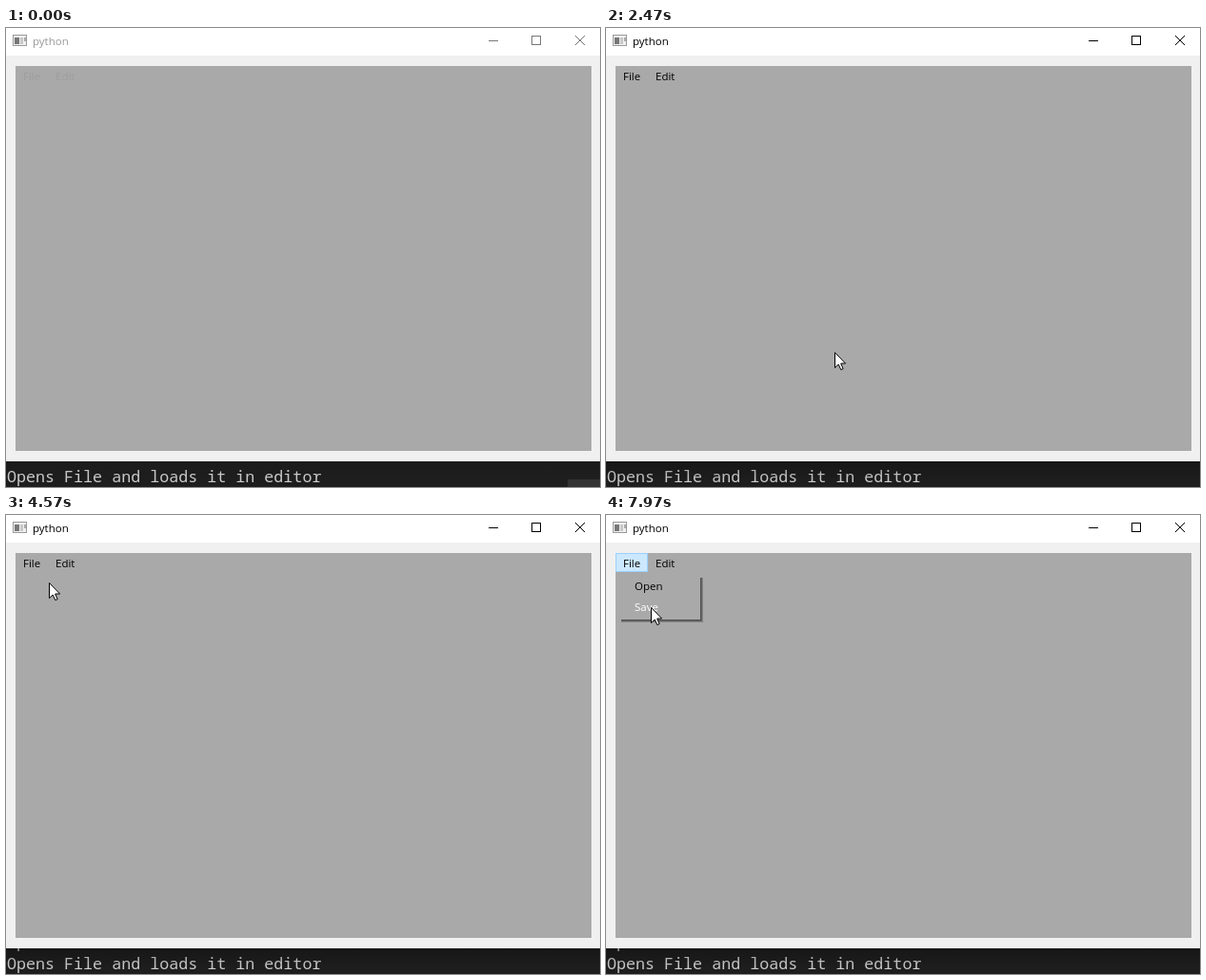
An HTML page for the animation above (8000 ms loop, 624x483 px).

```html
<!DOCTYPE html>
<html lang="en">
<head>
<meta charset="utf-8">
<title>python</title>
<style>
  html, body { margin: 0; width: 100%; height: 100%; overflow: hidden; }
  svg { display: block; width: 624px; height: 483px; }
  .ui { font: 11.5px "Open Sans", "Noto Sans", sans-serif; }
  .term { font: 16.7px "Noto Sans Mono", monospace; fill: #ccc; white-space: pre; }
  .caption { fill: none; stroke: currentColor; }
  .crisp { shape-rendering: crispEdges; }
</style>
</head>
<body>
<svg viewBox="0 0 624 483">
  <defs>
    <linearGradient id="shade" x2="0" y2="1">
      <stop stop-opacity=".25"/>
      <stop offset="1" stop-opacity="0"/>
    </linearGradient>
    <clipPath id="console"><rect y="456" width="624" height="27"/></clipPath>
  </defs>

  <rect width="624" height="456" fill="#f0f0f0"/>
  <rect width="624" height="29" fill="#fff"/>
  <rect x="10" y="40" width="605" height="405" fill="#a9a9a9"/>

  <!-- title bar -->
  <g class="crisp">
    <rect x="7.5" y="7.5" width="14" height="11" fill="#f0f0f0" stroke="#999"/>
    <rect x="9" y="10" width="5" height="7" fill="#777"/>
    <rect x="15" y="10" width="3" height="7" fill="#c8c8c8"/>
    <rect x="19" y="10" width="2" height="4" fill="#aaa"/>
  </g>
  <text id="title" class="ui" x="28" y="18">python</text>
  <g id="buttons" class="caption">
    <path class="crisp" d="M507 13.5h10M552.5 8.5h9v9h-9z"/>
    <path d="M598 8l10 10M608 8l-10 10"/>
  </g>

  <!-- menu bar -->
  <rect id="fileBox" class="crisp" x="10.5" y="40.5" width="33" height="19"/>
  <g id="bar" class="ui">
    <text x="18" y="55">File</text>
    <text x="52" y="55">Edit</text>
  </g>
  <g id="menu" class="ui">
    <g id="drop" fill-opacity=".22"></g>
    <rect x="10" y="60" width="89" height="50" fill="#a9a9a9"/>
    <text id="open" x="30" y="79">Open</text>
    <text id="save" x="30" y="101">Save</text>
  </g>

  <!-- console -->
  <g clip-path="url(#console)">
    <rect y="456" width="624" height="27" fill="#1e1e1e"/>
    <text id="previous" class="term" x="1" y="454.5">Opens File and loads it in editor</text>
    <text class="term" x="1" y="478">Opens File and loads it in editor</text>
    <rect id="shadow" y="456" width="624" height="21" fill="url(#shade)"/>
    <rect id="patch" x="590" y="475" width="34" height="8" fill="#333"/>
  </g>

  <path id="cursor" d="M.5 .5V16.6L4.2 13 6.8 18.6 9.1 17.6 6.7 12H11.6Z" fill="#fff" stroke="#000"/>
</svg>
<script>
const LOOP = 8000, REFRESH = 70;
const ENTER = 540, ACTIVATE = 1220, PRESS = 3740, CHOOSE = 4490, REOPEN = 7200;
const $ = id => document.getElementById(id);

// The pointer glides to each stop, then rests until the next glide
const glide = (start, end, x, y) => ({ start, end, x, y });
const glides = [
  glide(ENTER, 960, 520, 344),
  glide(1290, 1990, 357, 386),
  glide(1990, 2410, 240, 341),
  glide(2830, PRESS, 19, 44),
  glide(PRESS, 4230, 45, 71),
  glide(5430, 5570, 51, 71),
  glide(5770, 6260, 29, 52),
  glide(REOPEN, 7970, 47, 97)
];

// Soft drop shadow built from nested rectangles
for (let i = 1; i <= 3; i++) {
  const r = document.createElementNS("http://www.w3.org/2000/svg", "rect");
  const box = { x: 16, y: 66, width: 83 + i, height: 44 + i };
  for (const k in box) r.setAttribute(k, box[k]);
  $("drop").append(r);
}

const ease = u => u * u * (3 - 2 * u);

function pointer(t) {
  let x = 610, y = 468;
  for (const g of glides) {
    if (t < g.start) break;
    const shown = Math.floor((t - g.start) / REFRESH) * REFRESH;
    const k = ease(Math.min(1, shown / (g.end - g.start)));
    x += (g.x - x) * k;
    y += (g.y - y) * k;
  }
  return [Math.round(x), Math.round(y)];
}

const show = (id, on) => { $(id).style.visibility = on ? "visible" : "hidden"; };

function render(t) {
  const [x, y] = pointer(t);
  const active = t >= ACTIVATE;
  const pressed = (t >= PRESS && t < CHOOSE) || t >= REOPEN;
  const fading = t >= CHOOSE && t < CHOOSE + REFRESH;
  const hover = x >= 10 && x < 44 && y >= 40 && y < 60;

  show("cursor", t >= ENTER);
  $("cursor").setAttribute("transform", `translate(${x} ${y})`);

  $("title").style.fill = active ? "#000" : "#999";
  $("buttons").style.color = active ? "#000" : "#777";
  $("bar").style.fill = active ? "#000" : "#9e9e9e";
  $("shadow").style.opacity = active ? 1 : 0.3;

  show("fileBox", pressed || hover);
  $("fileBox").style.fill = pressed ? "#cce8ff" : "#e5f3ff";
  $("fileBox").style.stroke = pressed ? "#99d1ff" : "#cce8ff";

  show("menu", pressed || fading);
  $("menu").style.opacity = fading ? 0.5 : 1;
  $("open").style.fill = y >= 64 && y < 86 ? "#fff" : "#000";
  $("save").style.fill = y >= 86 && y < 108 ? "#fff" : "#000";

  show("previous", t >= CHOOSE);
  show("patch", t < REFRESH);
}

const begin = performance.now();
function tick() {
  render((performance.now() - begin) % LOOP);
  requestAnimationFrame(tick);
}
tick();
</script>
</body>
</html>
```
